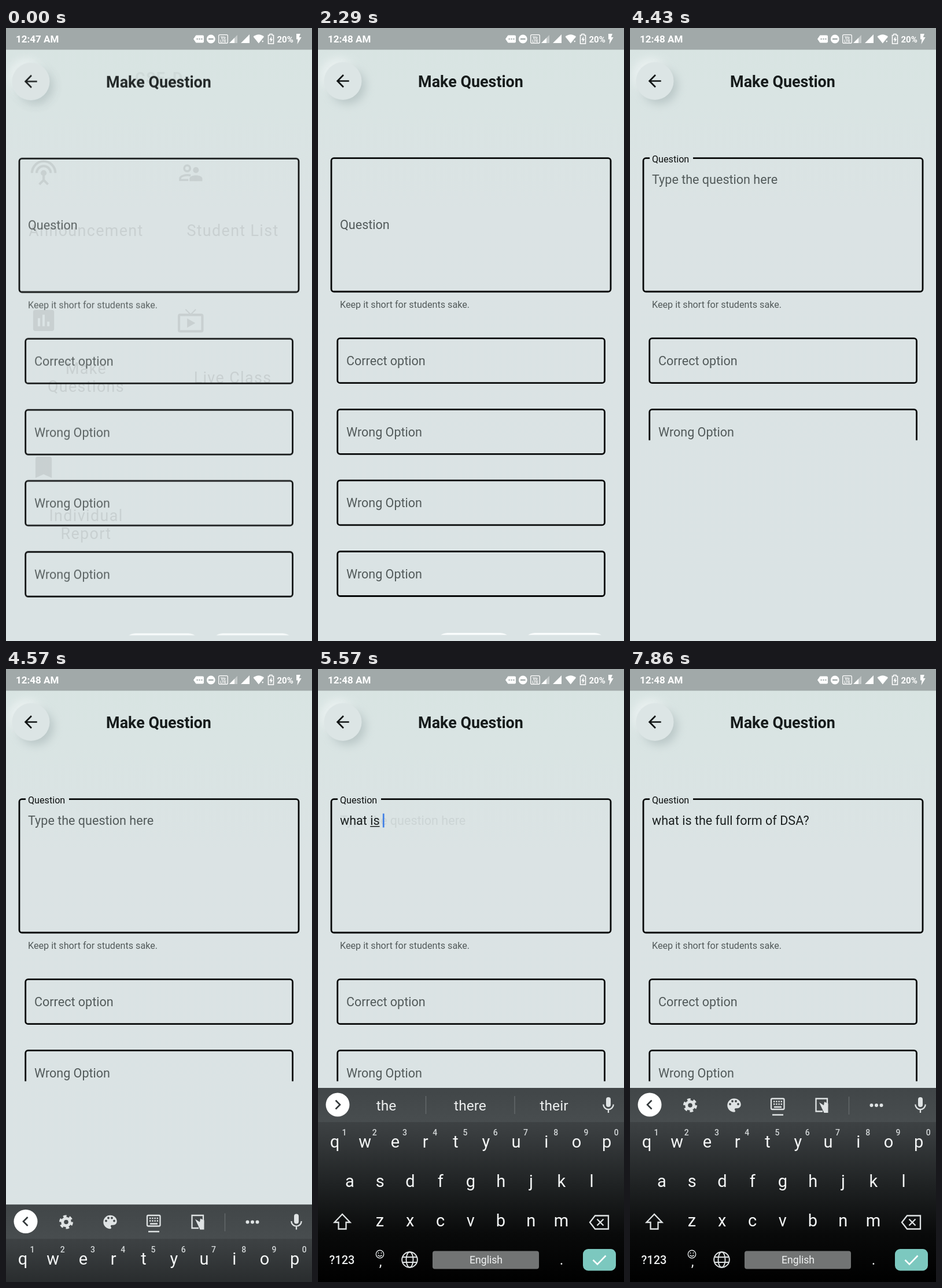
An HTML page for the animation above (8 s loop, 529 by 1058 pixels).

```html
<!DOCTYPE html>
<html lang="en">
<head>
<meta charset="utf-8">
<title>Make Question</title>
<style>
html, body { margin: 0; width: 100%; height: 100%; overflow: hidden; background: #dae3e3; }
svg { display: block; width: 529px; height: 1058px; font-family: Roboto, sans-serif; }
text { white-space: pre; }
.bold { font-weight: 700; }
.mid { text-anchor: middle; }
.body { font-size: 21.55px; }
.dim { fill: #525a5a; }
.line { fill: none; stroke: #050707; stroke-width: 2.8; }
.ghost text { font-size: 26.9px; letter-spacing: 1.35px; text-anchor: middle; }
.icon { fill: none; stroke: #dfe3e4; stroke-width: 2.3; }
.key { font-size: 29px; fill: #f4f6f6; text-anchor: middle; }
.digit { font-size: 14px; font-weight: 500; fill: #d3d7d8; text-anchor: middle; }
.word { font-size: 24.6px; fill: #eceeee; text-anchor: middle; }
.rule { stroke: #676c6e; stroke-width: 1.3; }
</style>
</head>
<body>
<svg viewBox="0 0 529 1058">
  <defs>
    <linearGradient id="paper" x2="0" y2="1">
      <stop offset="0" stop-color="#d8e4e2"/><stop offset=".12" stop-color="#d9e4e3"/>
      <stop offset=".3" stop-color="#dbe3e4"/><stop offset="1" stop-color="#dae3e4"/>
    </linearGradient>
    <linearGradient id="board" x2="0" y2="1">
      <stop offset="0" stop-color="#4a4f51"/><stop offset=".22" stop-color="#3a3e40"/>
      <stop offset=".5" stop-color="#1f2223"/><stop offset=".75" stop-color="#090a0a"/>
      <stop offset="1" stop-color="#000"/>
    </linearGradient>
    <linearGradient id="strip" x2="0" y2="1">
      <stop offset="0" stop-color="#414648"/><stop offset="1" stop-color="#484d4f"/>
    </linearGradient>
    <filter id="soft" x="-60%" y="-60%" width="220%" height="220%"><feGaussianBlur stdDeviation="8"/></filter>
    <clipPath id="view"><rect id="port" width="529" height="1047.5"/></clipPath>
  </defs>

  <rect width="529" height="1058" fill="url(#paper)"/>

  <g class="ghost" id="ghost">
    <text class="bold" x="265" y="96" opacity=".5">CSE-D</text>
    <g transform="translate(40.8 226) scale(2.02)">
      <path d="M2 12a10 10 0 0 1 20 0M6 12a6 6 0 0 1 12 0M12 13v5M8.3 21.7 12 18l3.7 3.7" fill="none" stroke="#000" stroke-width="2"/>
      <circle cx="12" cy="12" r="2.5"/>
    </g>
    <g transform="translate(295 226) scale(2.02)">
      <circle cx="9" cy="8" r="2.5" fill="none" stroke="#000" stroke-width="1.8"/>
      <path d="M12 14c-5-.8-9 .8-9 2.600V18h7" fill="none" stroke="#000" stroke-width="1.8"/>
      <circle cx="16.500" cy="9.500" r="2.500"/>
      <path d="M11 19v-2.200c0-3.700 11-3.700 11 0V19z"/>
    </g>
    <path transform="translate(40.800 480.500) scale(2.020)" fill-rule="evenodd" d="M5 3h14a2 2 0 0 1 2 2v14a2 2 0 0 1-2 2H5a2 2 0 0 1-2-2V5a2 2 0 0 1 2-2zM7 10v7h2v-7zM11 7v10h2V7zM15 13v4h2v-4z"/>
    <g transform="translate(295 481) scale(2.020)">
      <rect x="2" y="7" width="20" height="14" rx="1" fill="none" stroke="#000" stroke-width="2"/>
      <path d="M9 10v8l7-4z"/>
      <path d="M7.600 2.300 12 6.700l4.400-4.400" fill="none" stroke="#000"/>
    </g>
    <path transform="translate(40.800 734) scale(2.020)" d="M7 3h10a2 2 0 0 1 2 2v16l-7-3-7 3V5a2 2 0 0 1 2-2z"/>
    <text x="138.500" y="359">Announcement</text>
    <text x="392" y="359">Student List</text>
    <text x="138.500" y="597">Make</text>
    <text x="138.500" y="628">Questions</text>
    <text x="392" y="613">Live Class</text>
    <text x="138.500" y="851">Individual</text>
    <text x="138.500" y="882">Report</text>
  </g>

  <g id="page">
    <circle cx="35" cy="83" r="31" fill="#f1f6f6" opacity=".7" filter="url(#soft)"/>
    <circle cx="51" cy="100" r="31" fill="#a9b7b8" opacity=".65" filter="url(#soft)"/>
    <circle cx="43" cy="91.500" r="32.500" fill="#dce5e5"/>
    <path d="M53.700 91.500H34.500M44 81 33.600 91.500 44 102" fill="none" stroke="#101414" stroke-width="2.700"/>
    <text class="bold mid" x="264" y="101.500" font-size="26.900" fill="#161b1b">Make Question</text>
    <g id="form" clip-path="url(#view)">
      <path class="line" id="frame"/>
      <text x="38" y="482.500" font-size="16.160" class="dim">Keep it short for students sake.</text>
      <g fill="#fafdfd">
        <rect x="204" y="1044" width="131" height="50" rx="20"/>
        <rect x="355" y="1044" width="143" height="50" rx="20"/>
      </g>
    </g>
    <text id="label" x="38"></text>
    <text id="hint" class="body dim" x="38" y="269.300">Type the question here</text>
    <text id="typed" class="body" x="38" y="269.300" fill="#1b2020"></text>
    <rect id="under" y="271" height="1.500" fill="#1b2020"/>
    <rect id="caret" y="249.500" width="2.700" height="24" fill="#3f7fe6"/>
  </g>

  <g id="status" fill="#fff">
    <rect width="529" height="37.500" fill="#a1a9a9"/>
    <text id="clock" class="bold" x="17" y="25.300" font-size="17"></text>
    <path d="M324 19l4.500-6.500H340q2 0 2 2v9q0 2-2 2H328.500z"/>
    <path d="M329.500 19h10" stroke="#a1a9a9" stroke-width="2.200" stroke-dasharray="2.200 1.700"/>
    <circle cx="354.300" cy="19" r="7.400"/>
    <path d="M350 19h8.600" stroke="#a1a9a9" stroke-width="2.400"/>
    <rect x="367.700" y="11.700" width="15.600" height="14.600" rx="2" fill="none" stroke="#fff" stroke-width="1.300"/>
    <g class="bold mid" font-size="7"><text x="375.500" y="18.500">Vo</text><text x="375.500" y="25" font-size="6.500">LTE</text></g>
    <path d="M386 26 400 12v14z" opacity=".4"/>
    <path d="M386 26l9-9v9zM406 26l15-15v15z"/>
    <path d="M427.500 15q9.300-7.500 18.600 0L436.800 26.500z"/>
    <path id="traffic" d="M441.500 21.500h4.500l-2.200 4.500z" stroke="#a1a9a9"/>
    <path d="M453.500 12.500h2.500V10.500h4v2h2.500V27h-9z" fill="none" stroke="#fff" stroke-width="1.600"/>
    <path d="M459 14.500l-3.500 6h2v4.500l3.500-6h-2z"/>
    <text class="bold" x="468.500" y="25" font-size="15">20%</text>
    <path d="M502 10h7l-2.300 6h4L503.500 28l1-8.500H502z"/>
  </g>

  <g id="keyboard">
    <rect y="723" width="529" height="336" fill="url(#board)"/>
    <rect y="723" width="529" height="59" fill="url(#strip)"/>
    <circle cx="34" cy="752" r="20.500" fill="#fff"/>
    <path id="chevron" fill="none" stroke="#33383a" stroke-width="2.600"/>
    <g id="tools" class="icon">
      <circle cx="104" cy="753" r="6.300" stroke-width="5"/>
      <circle cx="104" cy="753" r="10" stroke-width="4" stroke-dasharray="5.600 4.872"/>
      <path transform="translate(164.400 737.400) scale(1.300)" fill="#dfe3e4" stroke="none" d="M12 3a9 9 0 0 0 0 18c1.600 0 2-1.500 1.100-2.500-.9-1-.3-2.500 1.100-2.500H16c2.800 0 5-2.200 5-5 0-4.400-4-8-9-8z"/>
      <path d="M173 751h0M177 746h0M183 746h0M187 751h0" stroke="#454a4c" stroke-width="3.800" stroke-linecap="round"/>
      <rect x="244" y="741.500" width="22.500" height="18.500" rx="2"/>
      <path d="M248 746.500h15M248 751h15" stroke-dasharray="2.400 1.800"/>
      <path d="M249 756h13M246 769.500h19"/>
      <path d="M333 763.500H321.500V741.500h19.500V756"/>
      <path d="M327 748l8 5 1-6 6.500 3V766h-7z" fill="#dfe3e4" stroke="none"/>
      <path class="rule" d="M378.500 738v31"/>
      <path d="M417.500 753h0M426 753h0M434.500 753h0" stroke-width="6" stroke-linecap="round"/>
    </g>
    <g id="words">
      <path class="rule" d="M186.500 737v31M340 737v31"/>
      <text class="word" x="118" y="761.500"></text>
      <text class="word" x="263" y="761.500"></text>
      <text class="word" x="408" y="761.500"></text>
    </g>
    <g class="icon">
      <rect x="498" y="739" width="8" height="17" rx="4" fill="#dfe3e4" stroke="none"/>
      <path d="M493.300 751.500a8.700 8.700 0 0 0 17.400 0M502 760v6"/>
      <path d="M42 941 28.500 955H35.500V966.500H48.500V955H55.500z"/>
      <path d="M479 943.500H502V966.500H479L470 955zM482.500 949.500l11 11M493.500 949.500l-11 11"/>
      <circle cx="107" cy="1010" r="6.700" stroke-width="1.400"/>
      <path d="M104.500 1008h0M109.500 1008h0" stroke-width="2" stroke-linecap="round"/>
      <path d="M103.500 1011.500q3.500 4 7 0" stroke-width="1.400"/>
      <circle cx="158.500" cy="1019.500" r="13.300" stroke-width="2"/>
      <ellipse cx="158.500" cy="1019.500" rx="6" ry="13.300" stroke-width="2"/>
      <path d="M146.500 1015h24M146.500 1024h24" stroke-width="2"/>
    </g>
    <text class="mid" x="41.500" y="1027" font-size="20" font-weight="500" fill="#eceeee">?123</text>
    <text class="key" x="108" y="1031" style="font-size:24px">,</text>
    <text class="key" x="421" y="1028" style="font-size:25px">.</text>
    <rect x="198" y="1004.500" width="184" height="31" rx="4" fill="#727474"/>
    <text class="mid" x="290.500" y="1026.300" font-size="17.700" fill="#f0f2f2">English</text>
    <rect x="458" y="1001" width="57" height="37.500" rx="9" fill="#7cc8bf"/>
    <path d="M475.500 1020l7.500 7.500 14.500-15" fill="none" stroke="#fff" stroke-width="2.600"/>
  </g>
</svg>
<script>
const LOOP = 8000;
const $ = id => document.getElementById(id);
const set = (el, attrs) => { for (const k in attrs) el.setAttribute(k, attrs[k]); };
const show = (id, on) => set($(id), { visibility: on ? 'visible' : 'hidden' });

function add(parent, tag, attrs, text = '') {
  const el = document.createElementNS('http://www.w3.org/2000/svg', tag);
  set(el, attrs);
  el.textContent = text;
  parent.append(el);
}

// answer fields
['Correct option', ...Array(3).fill('Wrong Option')].forEach((name, i) => {
  const y = 535.7 + i * 122.6;
  add($('form'), 'rect', { class: 'line', x: 33.7, y, width: 461.8, height: 77, rx: 4.5 });
  add($('form'), 'text', { class: 'body dim', x: 49, y: y + 46.3 }, name);
});

// letter keys
['qwertyuiop', 'asdfghjkl', 'zxcvbnm'].forEach((row, r) => [...row].forEach((ch, i) => {
  const x = [29, 55, 107][r] + i * 52.25;
  add($('keyboard'), 'text', { class: 'key', x, y: 826 + r * 68 }, ch);
  if (!r) add($('keyboard'), 'text', { class: 'digit', x: x + 16.5, y: 805 }, (i + 1) % 10);
}));

// value of the latest step reached at time t
const at = (steps, t) => steps.reduce((v, [start, next]) => t >= start ? next : v, steps[0][1]);

const FADE = [[0, 1], [140, .45], [290, 0]];
const FLOAT = [[0, 0], [4140, .36], [4290, 1]];
const HINT = [[0, 0], [4140, .5], [4290, 1], [5430, .45], [5570, .1], [5710, 0]];
const CARET = [[0, 0], [4140, 1], [4430, 0], [4860, 1], [7290, 0], [7710, 1], [7860, 0]];
const RISE = [[0, 336], [4570, 201.5], [4710, 0]];
const SENTENCE = 'what is the full form of DSA?';
const TYPED = [[0, 0], [5430, 5], [5570, 8], [5710, 12], [5860, 17], [6000, 22],
  [6140, 25], [6290, 26], [6430, 27], [6710, 28], [7000, 29]];
const WORDS = [[0, ''], [5430, 'what is the'], [5570, 'the there their'], [5860, 'full form first'],
  [6000, 'form forms from'], [6140, 'of for in'], [6430, 'DSA DS DNA'], [7710, '']];

function draw(t) {
  const fade = at(FADE, t), lift = at(FLOAT, t), count = at(TYPED, t), rise = at(RISE, t);

  set($('ghost'), { opacity: fade * .085 });
  set($('page'), { opacity: 1 - fade * .07, transform: `translate(0 ${fade * .7})` });
  $('clock').textContent = t < 2290 ? '12:47 AM' : '12:48 AM';
  show('traffic', t < 4710);
  set($('port'), { height: t < 4430 ? 1047.5 : 711.5 });

  // floating label and the gap it opens in the border
  const gap = lift === 0 ? 34 : lift < 1 ? 59 : 109;
  set($('frame'), { d: `M${gap} 224.6H501.500a4.500 4.500 0 0 1 4.500 4.500V450.500a4.500 4.500 0 0 1-4.500 4.500H27.500a4.500 4.500 0 0 1-4.500-4.500V229.100a4.500 4.500 0 0 1 4.500-4.500H34` });
  $('label').textContent = 'Question';
  set($('label'), {
    y: lift === 1 ? 231.8 : 347 - lift * 108,
    'font-size': 21.55 - lift * 5.39,
    fill: lift === 0 ? '#525a5a' : lift < 1 ? '#2b3131' : '#0c0f0f'
  });

  // typing
  const text = SENTENCE.slice(0, count), typed = $('typed');
  set($('hint'), { opacity: at(HINT, t) });
  typed.textContent = text;
  const width = n => n ? typed.getSubStringLength(0, n) : 0;
  set($('caret'), { x: 38 + width(count), opacity: at(CARET, t) });
  const end = text.trimEnd().length, start = text.trimEnd().lastIndexOf(' ') + 1;
  show('under', count > 0 && t < 7000);
  set($('under'), { x: 38 + width(start), width: width(end) - width(start) });

  // keyboard
  const words = at(WORDS, t);
  show('keyboard', rise < 336);
  set($('keyboard'), { transform: `translate(0 ${rise})` });
  set($('tools'), { display: words ? 'none' : 'inline' });
  set($('words'), { display: words ? 'inline' : 'none' });
  set($('chevron'), { d: words ? 'M30.500 744.500l7.500 7.500-7.500 7.500' : 'M37.500 744.500l-7.500 7.500 7.500 7.500' });
  const list = words.split(' ');
  $('words').querySelectorAll('text').forEach((el, i) => { el.textContent = list[i] || ''; });
}

function tick() {
  draw(performance.now() % LOOP);
  requestAnimationFrame(tick);
}
tick();
</script>
</body>
</html>
```
